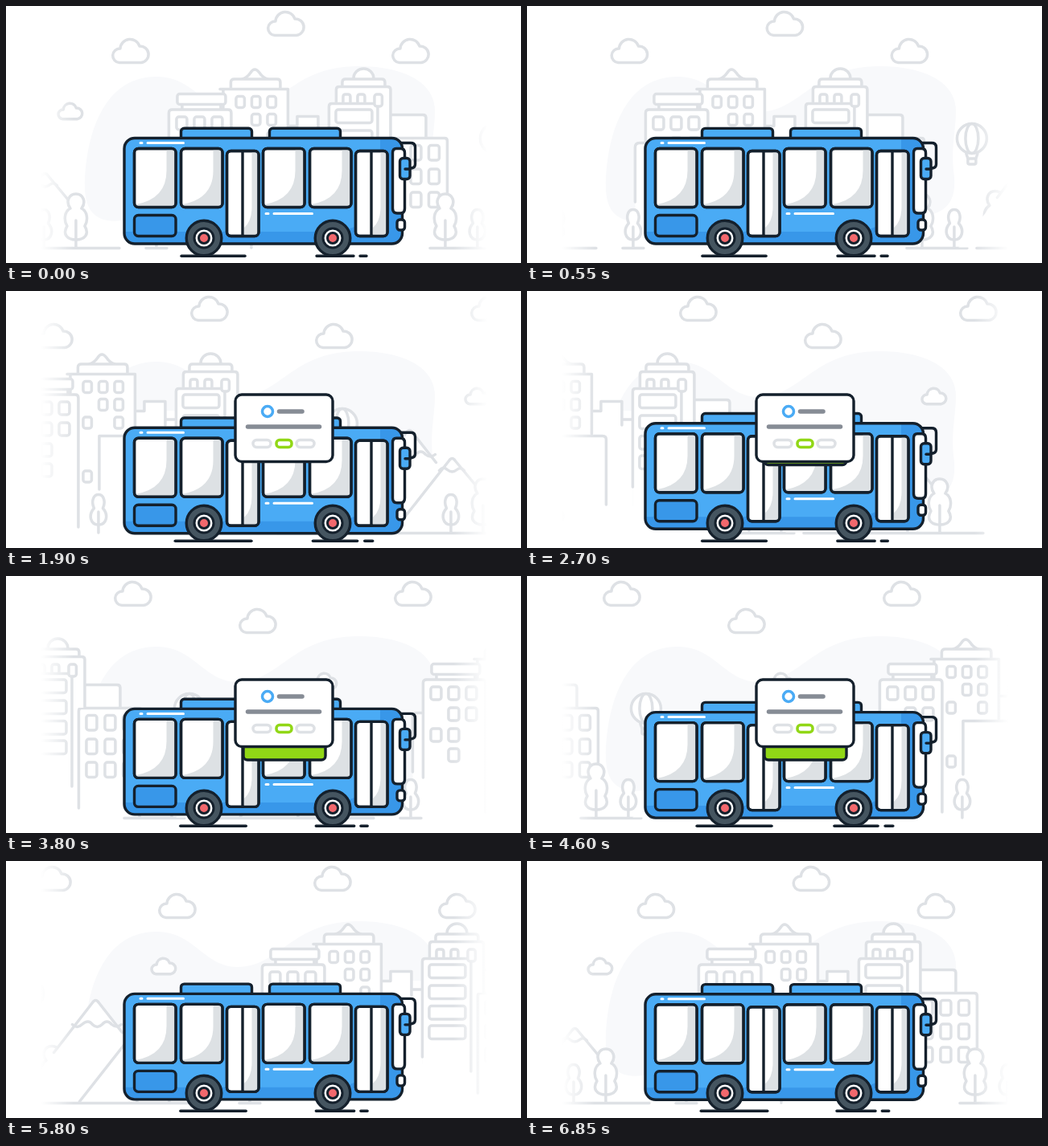
Animation of 640 by 320 pixels, one loop 6900 ms. Source, as an HTML page:

```html
<!DOCTYPE html>
<html lang="en">
<head>
<meta charset="utf-8">
<title>City bus</title>
<style>
html, body { margin: 0; width: 100%; height: 100%; overflow: hidden; background: #fff; }
svg { display: block; width: 100%; height: 100%; }
.line { fill: none; stroke: #dee1e5; stroke-width: 3.5; stroke-linecap: round; stroke-linejoin: round; }
.solid { fill: #fff; }
.wall { fill: #fff; stroke: none; }
.ink { stroke: #14202c; stroke-width: 3.4; stroke-linecap: round; stroke-linejoin: round; }
.none { fill: none; }
.blue { fill: #4aabf5; }
.deep { fill: #3897e9; }
.shade { fill: #dde1e4; stroke: none; }
.shine { stroke: #fff; stroke-width: 3; stroke-linecap: round; }
#pills rect { vector-effect: non-scaling-stroke; }
</style>
</head>
<body>
<svg viewBox="0 0 640 320" xmlns="http://www.w3.org/2000/svg">
  <defs>
    <linearGradient id="fadeL">
      <stop offset=".52" stop-color="#fff"/><stop offset="1" stop-color="#fff" stop-opacity="0"/>
    </linearGradient>
    <linearGradient id="fadeR">
      <stop offset="0" stop-color="#fff" stop-opacity="0"/><stop offset=".5" stop-color="#fff"/>
    </linearGradient>
    <clipPath id="bodyClip"><rect x="147" y="164.500" width="345.500" height="131.500" rx="13"/></clipPath>
    <path id="cloud" class="solid" d="M-14 14.500A8.500 8.500 0 0 1-13-3A12.300 12.300 0 0 1 11-6A10.300 10.300 0 0 1 13 14.500Z"/>
    <g id="bigTree">
      <path class="solid" d="M-7 252C-13 244-9 234 0 234S13 244 7 252C15 256 15 268 11 274C17 284 11 291 0 291S-17 284-11 274C-15 268-15 256-7 252Z"/>
      <path d="M0 267V301"/>
    </g>
    <g id="smallTree">
      <path class="solid" d="M0 253.500C7 253.500 9 263 5.500 270.500C13 279 10 291 0 291S-13 279-5.500 270.500C-9 263-7 253.500 0 253.500Z"/>
      <path d="M0 275V301"/>
    </g>
    <g id="city"></g>
    <g id="sky">
      <use href="#cloud" x="155" y="56"/><use href="#cloud" x="348" y="22"/>
    </g>
  </defs>

  <path fill="#f8f9fb" d="M98 225C98 178 113 88 187 88C235 88 245 132 288 132C340 132 355 75 437 75C500 75 533 98 533 130C533 155 527 175 530 205C535 240 525 258 490 262L150 266C115 273 98 258 98 225Z"/>
  <g class="line" id="clouds"></g>
  <g class="line" id="street"></g>
  <rect width="84" height="320" fill="url(#fadeL)"/>
  <rect x="556" width="84" height="320" fill="url(#fadeR)"/>

  <g class="ink none">
    <path id="shadowL" d="M218 311.300H297"/>
    <path id="shadowR" d="M386 311.300H432M440 311.300H448"/>
  </g>

  <g id="bus" class="ink">
    <rect class="blue" x="217.500" y="152.300" width="88" height="20" rx="4"/>
    <rect class="blue" x="327.500" y="152.300" width="88" height="20" rx="4"/>
    <path class="none" d="M490 170.500H503Q508.500 170.500 508.500 176V197Q508.500 202 502 202"/>
    <rect class="blue" x="147" y="164.500" width="345.500" height="131.500" rx="13" stroke="none"/>
    <path class="deep" stroke="none" clip-path="url(#bodyClip)" d="M147 281H400Q465 281 465 215V164H496V297H147Z"/>
    <rect class="none" x="147" y="164.500" width="345.500" height="131.500" rx="13"/>
    <rect class="deep" x="159.500" y="260.500" width="51.500" height="26" rx="5"/>
    <g id="panes"></g>
    <path class="solid" d="M485 177.500H490.500Q495.500 177.500 495.500 183V252Q495.500 258 490.500 258H486Q480.500 258 480.500 252V183Q480.500 177.500 485 177.500Z"/>
    <rect class="solid" x="486" y="266" width="9.500" height="13" rx="3.500"/>
    <rect class="blue" x="489.500" y="189.500" width="12.500" height="26" rx="4"/>
    <path d="M496 203H502"/>
    <path class="shine" d="M167 170.500H169M176 170.500H220.500M323 258.500H326M333 258.500H380.500"/>
  </g>
  <g id="wheels" class="ink"></g>

  <g id="card">
    <rect id="drawer" class="ink" x="295" y="180" width="102" height="49" rx="5" fill="#91d716"/>
    <rect class="ink solid" x="285" y="129" width="121" height="83.500" rx="8"/>
    <circle id="dot" cx="325" cy="150" r="6.500" fill="none" stroke="#4aabf5" stroke-width="3.500"/>
    <g stroke="#868c95" stroke-width="5.500" stroke-linecap="round">
      <path id="bar"/>
      <path id="rule"/>
    </g>
    <g id="pills" fill="none" stroke="#dee1e5" stroke-width="3.500">
      <rect x="307" y="185.500" width="22" height="9" rx="4.500"/>
      <rect id="choice" x="336" y="185.500" width="19" height="9" rx="4"/>
      <rect x="361" y="185.500" width="22" height="9" rx="4.500"/>
    </g>
  </g>
</svg>

<script>
const $ = id => document.getElementById(id);
const LOOP = 6900, BOB = 1600 / 3, CITY = 696, SKY = 348, GROUND = 301;

const box = (x, y, w, h, r = 3, cls = '') =>
  `<rect class="${cls}" x="${x}" y="${y}" width="${w}" height="${h}" rx="${r}"/>`;
const path = (d, cls = '') => `<path class="${cls}" d="${d}"/>`;
// White mass that hides whatever stands behind a building.
const wall = (x, y, w, bottom = GROUND) => box(x, y, w, bottom - y, 3, 'wall');
// Each row: top edge, then the left edges of its windows.
const grid = (rows, w, h) =>
  rows.map(([y, ...xs]) => xs.map(x => box(x, y, w, h)).join('')).join('');
const use = (id, x, y = 0) => `<use href="#${id}" x="${x}" y="${y}"/>`;

function buildCity() {
  const mountains = '<g transform="translate(-.5 -1.5)">' +
    path('M-104 302L-4 174L98 302Z', 'wall') +
    path('M-56 240L-8 178Q-4 172 0 178L29 215') +
    path('M-33 205Q-27 211-21 205Q-13 198-8 205Q-2 211 4 205Q10 198 16 205Q22 210 28 205') +
    path('M-24 302L49 209L126 302Z', 'wall') +
    path('M-24 301L45 213Q49 207 53 213L78 243') +
    path('M33 225Q38 219 43 224Q49 229 55 224Q60 220 64 225') + '</g>';

  const hotel = wall(270, 103, 81) + wall(351, 149, 50) + wall(362, 137, 26) +
    path('M294 91Q300 89 304 83Q309 75 315 83Q319 89 325 91', 'solid') +
    path('M279.500 102V95Q279.500 91 284 91H337Q341 91 341 95V102', 'solid') +
    path('M270 127V103.500H350.500V178M270 103.500H266') +
    grid([[112.500, 286, 305.500, 325], [134.500, 305.500, 325], [157, 286, 325], [224, 286]], 10.500, 14) +
    path('M306 247V180.500H364Q368.500 180.500 368.500 185V266') +
    path('M351 149.500H362V137.500H388V167M389 160H400');

  const brick = wall(202.5, 128, 77.5) + wall(189.5, 171, 14) +
    box(219, 120, 48, 8, 0, 'wall') + box(213, 109.5, 60, 13, 3, 'solid') +
    path('M219 123V128M267 123V128') +
    path('M202.500 251V133Q202.500 129 207 129H276Q280 129 280 133V294') +
    path('M189.500 244V176Q189.500 170.500 195 170.500H201') +
    grid([[138, 212, 234, 256], [164, 234, 256], [190, 212, 234], [215, 234]], 13, 16);

  const flats = wall(478, 136, 44) + wall(470.5, 165, 78) +
    path('M478 135.500H518Q522 135.500 522 139V163') +
    path('M470.500 289V168Q470.500 164.500 474 164.500H545Q548.500 164.500 548.500 168V240') +
    grid([[173.500, 480, 503, 525.500], [203, 480, 503, 525.500], [232, 480, 503, 525.500]], 13, 18.500);

  const tower = wall(410.5, 101, 67.5, 164) + wall(401.5, 122, 60.5) +
    path('M432 90A12.500 12 0 0 1 457 90', 'solid') +
    path('M418 100V95Q418 91 422 91H467Q471 91 471 95V100', 'solid') +
    path('M410.500 120V104Q410.500 100.500 414 100.500H474Q478 100.500 478 104V163') +
    path('M419 120V113Q419 110 422 110H425Q428 110 428 113V120') +
    path('M437 120V113Q437 110 440 110H443Q446 110 446 113V120') +
    path('M401.500 244V125Q401.500 121.500 405 121.500H457M462 126V262') +
    box(458, 110, 9.500, 15) +
    grid([[129, 410], [155, 410], [180.500, 410], [205, 410]], 45, 16.500);

  const balloon = `<circle class="solid" cx="608" cy="165" r="18.500"/><ellipse cx="608" cy="165" rx="8" ry="18.500"/>` +
    path('M601 184L603 190M615 184L613 190') + box(603, 190, 10, 7, 2, 'solid');

  const ground = path('M-82 301.500H141M174 301.500H200M527 301.500H602');
  const trees = use('bigTree', 87) + use('bigTree', 546) + use('bigTree', 637, -3.5) +
    [47, 187, 305, 586].map(x => use('smallTree', x)).join('');
  const puff = `<g transform="translate(80 131) scale(.67)" stroke-width="5.2" style="stroke-width:5.2">${use('cloud', 0)}</g>`;

  $('city').innerHTML = mountains + puff + hotel + brick + flats + tower + balloon + ground + trees;
}

function buildBus() {
  const pane = x => box(x, 177.5, 51.500, 73, 5, 'solid') +
    path(`M${x + 40} 179H${x + 47}Q${x + 50} 179 ${x + 50} 182V246Q${x + 50} 249 ${x + 47} 249H${x + 5}Q${x + 2} 249 ${x + 2} 247Q${x + 40} 240 ${x + 40} 205Z`, 'shade') +
    box(x, 177.5, 51.500, 73, 5, 'none');
  const door = x => box(x, 180.5, 39.5, 106, 5, 'solid') +
    path(`M${x + 31} 182H${x + 36}Q${x + 38} 182 ${x + 38} 185V282Q${x + 38} 285 ${x + 36} 285H${x + 21.500}V276Q${x + 31} 268 ${x + 31} 250Z`, 'shade') +
    box(x, 180.5, 39.5, 106, 5, 'none') + path(`M${x + 19.5} 181V286`);
  $('panes').innerHTML = [159.500, 217.500, 319.500, 377.500].map(pane).join('') +
    [274.500, 434.500].map(door).join('');
  $('wheels').innerHTML = [246, 406].map(x =>
    `<circle cx="${x}" cy="289" r="21.800" fill="#455560"/>
     <circle cx="${x}" cy="289" r="12" fill="#fff" stroke-width="3"/>
     <circle cx="${x}" cy="289" r="6.500" fill="#f2686d" stroke-width="3"/>`).join('');
}

buildCity();
buildBus();
$('street').innerHTML = [-1, 0, 1].map(k => use('city', k * CITY)).join('');
$('clouds').innerHTML = [-1, 0, 1, 2].map(k => use('sky', k * SKY)).join('');

const ramp = (t, a, b) => {
  const p = Math.min(1, Math.max(0, (t - a) / (b - a)));
  return p * p * (3 - 2 * p);
};
const scaleAt = (x, y, sx, sy = sx) =>
  `translate(${x} ${y}) scale(${sx} ${sy}) translate(${-x} ${-y})`;
const set = (id, name, value) => $(id).setAttribute(name, value);

function drawCard(t) {
  const size = ramp(t, 800, 1130) * (1 - ramp(t, 5050, 5400));
  set('card', 'visibility', size > 0.005 ? 'visible' : 'hidden');
  set('card', 'transform', scaleAt(345.5, 170.5, size));
  const grow = ramp(t, 850, 1330);
  const bar = 28.500 * grow, half = 44.500 * grow;
  set('dot', 'r', 6.5 * ramp(t, 850, 1270));
  set('bar', 'd', `M339.500 150h${bar}`);
  set('rule', 'd', `M${345 - half} 169H${345 + half}`);
  set('pills', 'transform', scaleAt(345, 190, ramp(t, 850, 1210), 1));
  set('choice', 'stroke', t < 1900 ? '#dee1e5' : '#91d716');
  const open = ramp(t, 2550, 3000) * (1 - ramp(t, 4750, 5050));
  set('drawer', 'transform', `translate(0 ${-17 * (1 - open)})`);
}

function draw(t) {
  set('street', 'transform', `translate(${-t * 0.1} 0)`);
  set('clouds', 'transform', `translate(${-t * 0.05} 0)`);
  const bob = (1 - Math.cos(t / BOB * 2 * Math.PI)) / 2;
  set('bus', 'transform', `translate(0 ${6 * bob})`);
  set('shadowL', 'transform', scaleAt(257, 311.3, 1 + 0.2 * bob, 1));
  set('shadowR', 'transform', scaleAt(409, 311.3, 1 + 0.2 * bob, 1));
  drawCard(t);
}

const start = performance.now();
function tick() {
  draw((performance.now() - start) % LOOP);
  requestAnimationFrame(tick);
}
tick();
</script>
</body>
</html>
```
